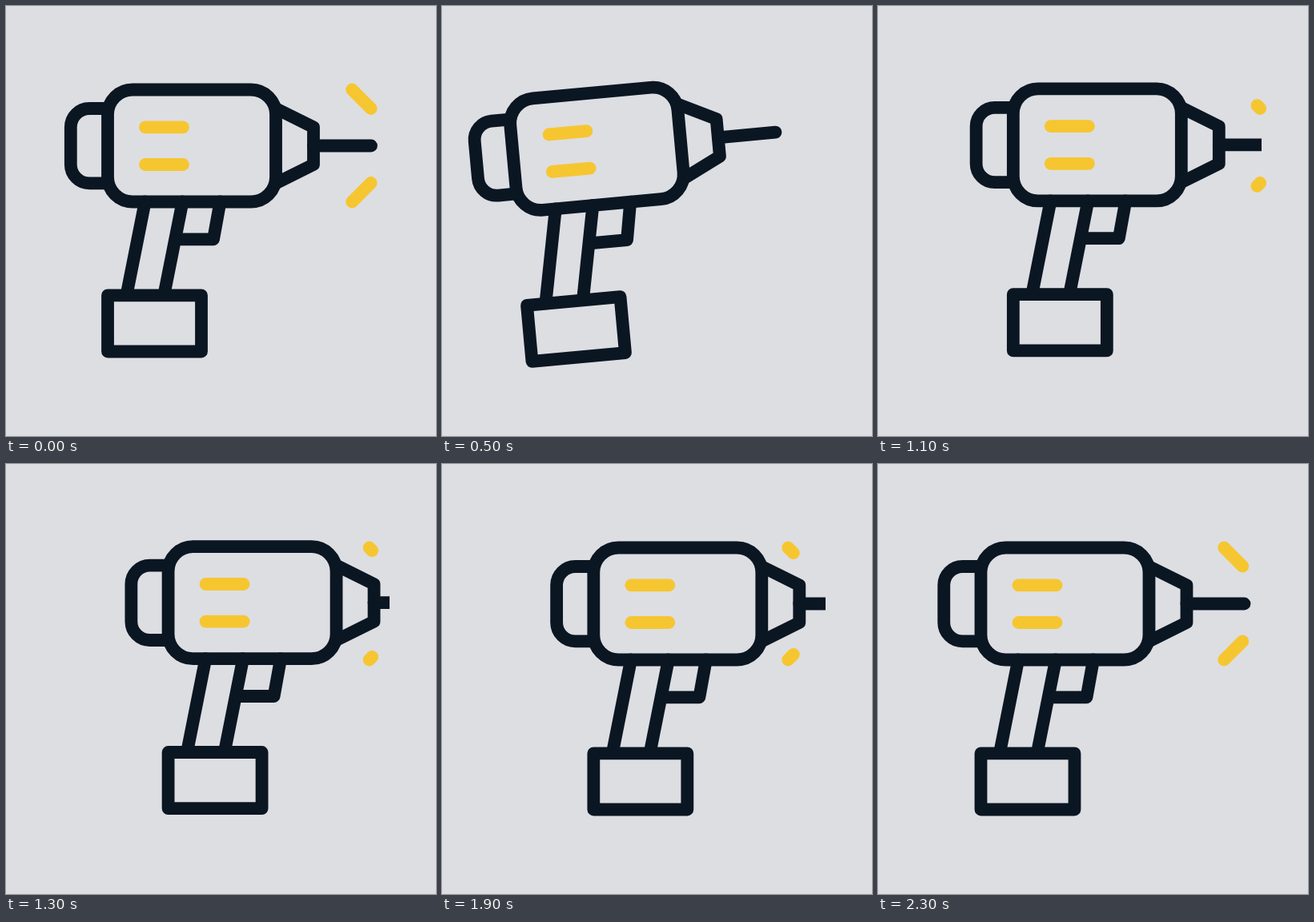
Recreate the animation shown at these times as an HTML page with a canvas. Size 537 by 537 pixels, loop 2.4 s.

```html
<!DOCTYPE html>
<html lang="en">
<head>
<meta charset="utf-8">
<title>Power drill</title>
<style>
  html, body { margin: 0; width: 100%; height: 100%; overflow: hidden; background: #dddee2; }
  canvas { display: block; width: 100vw; height: 100vh; }
</style>
</head>
<body>
<canvas id="stage" width="537" height="537"></canvas>
<script>
const ctx = document.getElementById('stage').getContext('2d');
const SIZE = 537, MID = SIZE / 2, LOOP = 2400;
const NAVY = '#0b1623', YELLOW = '#f6c631', BACK = '#dddee2';
const AXIS = 174.5, WALL = 479;

// Eased progress from 0 to 1 between two times
function ease(t, from, to) {
  const s = Math.min(1, Math.max(0, (t - from) / (to - from)));
  return s * s * (3 - 2 * s);
}

function line(...pts) {
  ctx.beginPath();
  for (let i = 0; i < pts.length; i += 2) ctx.lineTo(pts[i], pts[i + 1]);
  ctx.stroke();
}

function drawBody() {
  ctx.strokeStyle = NAVY;
  ctx.beginPath();
  ctx.roundRect(127, 104.5, 210, 140, 31);
  ctx.stroke();

  ctx.beginPath();
  ctx.moveTo(127, 128);
  ctx.arcTo(80.8, 128, 80.8, AXIS, 23.3);
  ctx.arcTo(80.8, 221.3, 127, 221.3, 23.3);
  ctx.lineTo(127, 221.3);
  ctx.stroke();

  line(337, 128, 384, 151.3, 384, 198, 337, 221.3);
  line(173.7, 244.5, 150.5, 361);
  line(220.5, 244.5, 197.3, 361);
  line(267.5, 244.5, 259, 291.3, 212, 291.3);
  ctx.strokeRect(127, 361.3, 117, 70.2);

  ctx.strokeStyle = YELLOW;
  line(174, 151.3, 221, 151.3);
  line(174, 198, 221, 198);
}

// Visible part of each spark, 0 at the inner end and 1 at the outer end
function drawSparks(start, end, shift) {
  if (end <= start) return;
  ctx.strokeStyle = YELLOW;
  const x = u => 455.7 + shift - 23.5 * u;
  const y = u => 46.5 + 23.5 * u;
  for (const side of [-1, 1])
    line(x(start), AXIS + side * y(start), x(end), AXIS + side * y(end));
}

function sparkState(t, recoil) {
  if (t < 355) return [recoil, 1, 21.5 * recoil];
  if (t < 1500) {
    const t0 = t < 1050 ? 760 : 1050;
    return [ease(t, t0 + 100, t0 + 300), ease(t, t0, t0 + 200), 21.5];
  }
  return [1 - ease(t, 1655, 2355), 1, 0];
}

function draw(t) {
  const recoil = ease(t, 0, 355) - ease(t, 355, 805);
  const push = 87 * (ease(t, 760, 1460) - ease(t, 1655, 2355));
  const shake = t > 760 && t < 1460 ? -1.3 * Math.cos((t - 1300) / 219 * 2 * Math.PI) : 0;

  ctx.fillStyle = BACK;
  ctx.fillRect(0, 0, SIZE, SIZE);
  ctx.lineWidth = 15.8;
  ctx.lineCap = ctx.lineJoin = 'round';

  ctx.save();
  ctx.translate(MID - 40 * recoil, MID);
  ctx.rotate(-7 * recoil * Math.PI / 180);
  ctx.translate(-MID, -MID);

  ctx.save();
  ctx.translate(push, shake);
  drawBody();
  ctx.restore();

  // The bit sinks into an unseen wall
  ctx.save();
  ctx.beginPath();
  ctx.rect(0, 0, WALL, SIZE);
  ctx.clip();
  ctx.strokeStyle = NAVY;
  ctx.translate(push, shake);
  line(384, AXIS, 456, AXIS);
  ctx.restore();

  drawSparks(...sparkState(t, recoil));
  ctx.restore();
}

const begin = performance.now();
function tick() {
  draw((performance.now() - begin) % LOOP);
  requestAnimationFrame(tick);
}
tick();
</script>
</body>
</html>
```
